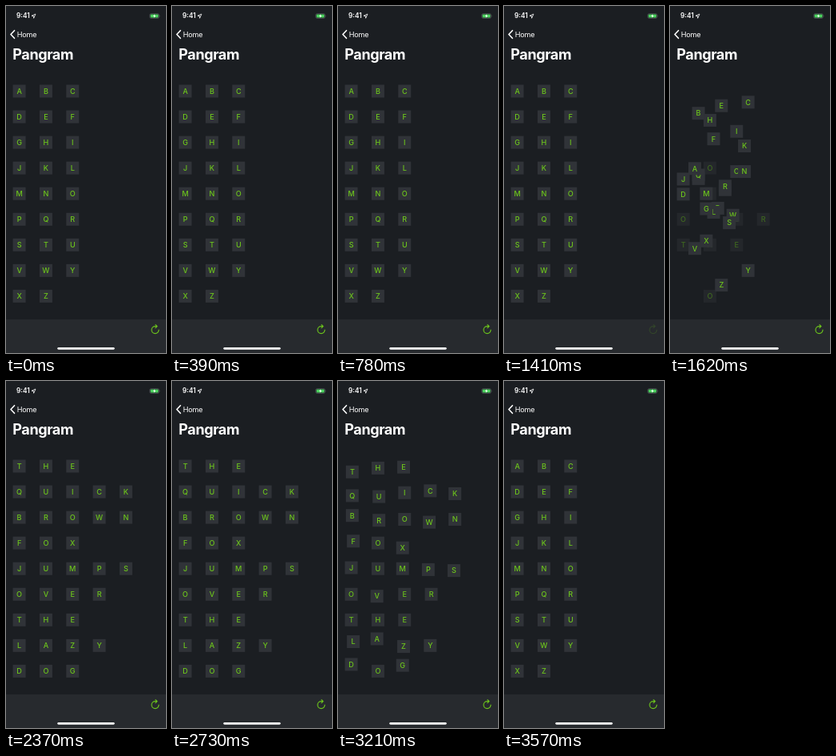
Write an HTML page that moves like this. It is 200 px wide and 434 px high and loops after 3.6 s.

```html
<!DOCTYPE html>
<html lang="en">
<head>
<meta charset="utf-8">
<title>Pangram</title>
<style>
html, body { margin: 0; width: 100%; height: 100%; overflow: hidden; background: #1b1e22; }
svg { display: block; width: 200px; height: 434px; font-family: Inter, sans-serif; fill: #fff; }
.tile rect { fill: #303338; }
.tile text { fill: #6cc41c; font-size: 9.1px; font-weight: 500; text-anchor: middle; }
.line { fill: none; stroke: #fff; stroke-linecap: round; stroke-linejoin: round; }
#refresh { stroke: #6cc41c; stroke-width: 1.15; }
</style>
</head>
<body>
<svg viewBox="0 0 200 434">
  <rect width="200" height="434" fill="#1b1e22"/>
  <text x="13" y="15.4" font-size="8.3" font-weight="600">9:41</text>
  <path class="line" d="M36.6 10.2 32 12.3 34.3 12.6 34.6 14.9Z" stroke-width=".8"/>
  <rect x="179.8" y="9.7" width="11.4" height="5.6" rx="1.5" fill="none" stroke="#777b7e" stroke-width=".5"/>
  <path d="M191.9 11.5q1 1 0 2z" fill="#777b7e"/>
  <rect x="180.6" y="10.5" width="9.8" height="4" rx=".8" fill="#4cd25f"/>
  <path d="M186.3 9.9 183.7 12.8H185.3L184.7 15.1 187.3 12.1H185.7Z"/>
  <path class="line" d="M10.5 30.7 6 35.5 10.5 40.3" stroke-width="1.6"/>
  <text x="13.7" y="38.8" font-size="9.1" letter-spacing="-.22">Home</text>
  <text x="8.3" y="66.5" font-size="18.1" font-weight="700" letter-spacing="-.45">Pangram</text>
  <g id="tiles"></g>
  <rect y="392" width="200" height="42" fill="#272a2e"/>
  <path id="refresh" class="line" d="M191 405.1A4.5 4.5 0 1 1 186.5 400.6H188.6M186.9 398.6 189 400.6 186.9 402.6"/>
  <rect x="64.3" y="427" width="71.4" height="2.7" rx="1.35"/>
</svg>
<script>
const LOOP = 3600, MOVE = 350, SCRAMBLE = 1460, SORT = 3163;
const ALPHABET = 'ABC DEF GHI JKL MNO PQR STU VWY XZ';
const SENTENCE = 'THE QUICK BROWN FOX JUMPS OVER THE LAZY DOG';

const layout = text => text.split(' ').flatMap((word, row) =>
  [...word].map((letter, col) => ({ letter, x: 16.6 + col * 33.33, y: 106.5 + row * 32.05 })));

const sorted = layout(ALPHABET);
const used = new Set();
const group = document.getElementById('tiles');
const refresh = document.getElementById('refresh');

// The first use of a letter travels; repeats fade in place.
const tiles = layout(SENTENCE).map(end => {
  const repeat = used.has(end.letter);
  used.add(end.letter);
  const start = repeat ? end : sorted.find(s => s.letter === end.letter);
  const node = document.createElementNS('http://www.w3.org/2000/svg', 'g');
  node.setAttribute('class', 'tile');
  node.innerHTML = `<rect x="-8" y="-8" width="16" height="16"/><text y="3.3">${end.letter}</text>`;
  if (repeat) group.prepend(node); else group.append(node);
  return { node, start, end, repeat };
});

const clamp = v => Math.min(1, Math.max(0, v));
const mix = (a, b, k) => a + (b - a) * k;

// cubic-bezier(.42, 0, .58, 1)
function easeInOut(x) {
  if (x <= 0 || x >= 1) return clamp(x);
  let lo = 0, hi = 1, s;
  for (let i = 0; i < 24; i++) {
    s = (lo + hi) / 2;
    const bx = 1.26 * s * (1 - s) ** 2 + 1.74 * s * s * (1 - s) + s ** 3;
    if (bx < x) lo = s; else hi = s;
  }
  return s * s * (3 - 2 * s);
}

const press = (t, release) => clamp((t - release + 110) / 20) * clamp((release + 30 - t) / 40);

function draw(now) {
  const t = now % LOOP;
  const k = easeInOut((t - SCRAMBLE) / MOVE) - easeInOut((t - SORT) / MOVE);
  for (const { node, start, end, repeat } of tiles) {
    node.setAttribute('transform', `translate(${mix(start.x, end.x, k)} ${mix(start.y, end.y, k)})`);
    if (repeat) node.setAttribute('opacity', k);
  }
  refresh.setAttribute('opacity', 1 - 0.82 * Math.max(press(t, SCRAMBLE), press(t, SORT)));
}

const begin = performance.now();
function tick() {
  draw(performance.now() - begin);
  requestAnimationFrame(tick);
}
tick();
</script>
</body>
</html>
```
